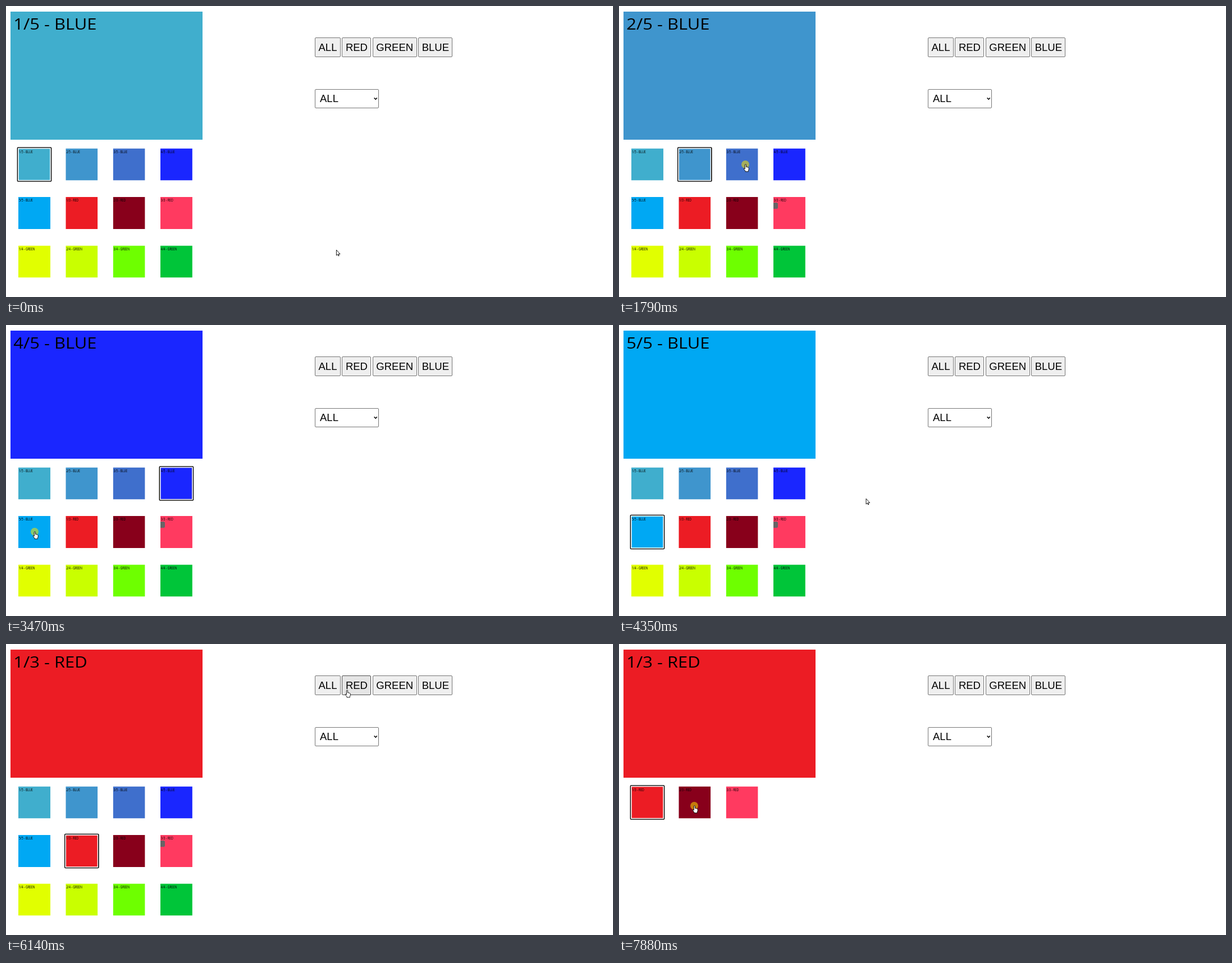
These frames come from a looping animation (1081x518 px, 8000 ms). An HTML page:

```html
<!DOCTYPE html>
<html lang="en">
<head>
<meta charset="utf-8">
<title>Colour gallery filter</title>
<style>
  html, body { margin: 0; width: 100%; height: 100%; overflow: hidden; background: #fff; }
  #stage { display: block; width: 100%; height: 100%; }
  .label { font: 27.1px "Open Sans", "Noto Sans", sans-serif; }
  .ui text { font: 18.5px "Liberation Sans", Arial, sans-serif; }
  .button rect { fill: #efefef; stroke: #767676; }
  .button.hover rect { fill: #e5e5e5; stroke: #4f4f4f; }
  .button.down rect { fill: #f5f5f5; stroke: #8d8d8d; }
  .cursor { fill: #fff; stroke: #000; stroke-width: .9; stroke-linejoin: round; }
</style>
</head>
<body>
<svg id="stage" viewBox="0 0 1081 518">
  <g id="gallery"></g>
  <g id="ring" fill="none">
    <rect x="-1.5" y="-1.5" width="60" height="60" rx="1" stroke="#000" stroke-width="1.6"/>
    <rect width="57" height="57" stroke="#fff" stroke-width="1.4"/>
  </g>
  <path id="smudge" d="M275 350h5.5q2.5 0 2.5 2.5v6q0 2.5-2.5 2.5h-5.5z" fill="#686466"/>
  <g class="ui" id="buttons"></g>
  <g class="ui">
    <rect x="550.5" y="148.5" width="113" height="33" rx="1.5" fill="#fff" stroke="#767676"/>
    <text x="559" y="171.4">ALL</text>
    <path d="M655.6 163.4l2.6 2.7 2.6-2.7" fill="none" stroke="#000" stroke-width="1.5"/>
  </g>
  <g id="pointer">
    <circle id="press" r="7" fill="rgba(250,225,0,.55)"/>
    <path id="arrow" class="cursor" d="M.4 .2V10L2.6 8 4 11 5.3 10.4 4 7.5H7Z"/>
    <path id="hand" class="cursor" d="M-.7 1Q-.7-.2.4-.2T1.5 1V4.4L3 4.6 4.4 5 5.6 5.6Q6.2 6 6.2 7V9L5.3 11.3V12.8H-.1V11.6L-2.6 8.4Q-3.1 7-2.1 6.9L-.7 8Z"/>
  </g>
</svg>
<script>
const LOOP = 8000;
const FRAME = 1000 / 15;
const SIZE = 57;
const HOLD = 60;
const $ = id => document.getElementById(id);

const GROUPS = {
  BLUE: ["#40aecd", "#3f95cd", "#3f6fcc", "#1a26ff", "#00a8f3"],
  RED: ["#ec1c24", "#88001b", "#ff3a60"],
  GREEN: ["#e1ff00", "#c9ff00", "#6eff00", "#00c539"]
};
const SLIDES = Object.entries(GROUPS).flatMap(([group, fills]) =>
  fills.map((fill, i) => ({ group, fill, label: `${i + 1}/${fills.length} - ${group}` })));
const FIRST_RED = SLIDES.findIndex(s => s.group === "RED");

// Pointer trips: each ends at a point, curving towards "via", and may end in a click
const HOME = [588, 434];
const TRIPS = [
  { leave: 70, arrive: 600, to: [130, 280], via: [350, 395], click: 920 },
  { leave: 1250, arrive: 1530, to: [225, 282], click: 1790 },
  { leave: 1930, arrive: 2330, to: [305, 288], click: 2530 },
  { leave: 2660, arrive: 3010, to: [51, 368], via: [150, 390], click: 3470 },
  { leave: 3870, arrive: 4630, to: [207, 427], via: [840, 130] },
  { leave: 4700, arrive: 4840, to: [141, 367], click: 4970, hold: 2 * HOLD },
  { leave: 5310, arrive: 6210, to: [614, 78], click: 6670 },
  { leave: 7200, arrive: 7810, to: [134, 288], via: [-180, 600], click: 7880, hold: 2 * HOLD }
];
const CLICKS = TRIPS.filter(trip => trip.click)
  .map(({ click, hold = HOLD }) => ({ down: click, up: click + hold }));

function make(parent, name, attrs, text) {
  const el = document.createElementNS("http://www.w3.org/2000/svg", name);
  for (const key in attrs) el.setAttribute(key, attrs[key]);
  if (text) el.textContent = text;
  return parent.appendChild(el);
}

function makeSlide({ label, fill }, x, y, width, height) {
  const box = make($("gallery"), "svg", { x, y, width, height, viewBox: "0 0 300 228", preserveAspectRatio: "none" });
  make(box, "rect", { width: 300, height: 228, fill });
  make(box, "text", { x: 4.7, y: 32.3, class: "label" }, label);
  return box;
}

const mains = SLIDES.map(s => makeSlide(s, 8, 10, 342, 228));
const thumbs = SLIDES.map(s => makeSlide(s, 0, 0, SIZE, SIZE));

// Buttons sit in a row, each as wide as its text plus padding
let edge = 550;
const buttons = ["ALL", "RED", "GREEN", "BLUE"].map(label => {
  const el = make($("buttons"), "g", { class: "button" });
  const rect = make(el, "rect", { y: 56.5, height: 34, rx: 1.5 });
  const text = make(el, "text", { x: edge + 6.5, y: 79.9 }, label);
  const x = Math.round(edge);
  const width = Math.round(text.getComputedTextLength() + 12.9);
  rect.setAttribute("x", x + .5);
  rect.setAttribute("width", width - 1);
  edge += width + 2.4;
  return { el, x, width };
});

const show = (el, on) => { el.style.display = on ? "" : "none"; };
const cell = i => [22 + 84.3 * (i % 4), 253.5 + 86.5 * Math.floor(i / 4)];
const inside = ([px, py], x, y, w, h) => px >= x && px < x + w && py >= y && py < y + h;

function pointerAt(t) {
  const i = TRIPS.findLastIndex(trip => t >= trip.leave);
  if (i < 0) return HOME;
  const { leave, arrive, to, via } = TRIPS[i];
  if (t >= arrive) return to;
  const from = i ? TRIPS[i - 1].to : HOME;
  const steps = Math.round((arrive - leave) / FRAME) + 1;
  const u = Math.min(1, Math.floor((t - leave) / FRAME + 1) / steps);
  const e = u * u * (3 - 2 * u);
  return to.map((end, k) => {
    const bend = via ? via[k] : (from[k] + end) / 2;
    return (1 - e) ** 2 * from[k] + 2 * e * (1 - e) * bend + e * e * end;
  });
}

function draw(t) {
  // Clicks walk through the slides up to the first red one, then the RED button filters
  const done = CLICKS.filter(c => t >= c.up).length;
  const chosen = Math.min(done, FIRST_RED);
  const filtered = done > FIRST_RED;
  const pressed = CLICKS.some(c => t >= c.down && t < c.up);
  const pos = pointerAt(t);
  let link = false;

  mains.forEach((el, i) => show(el, i === chosen));
  thumbs.forEach((el, i) => {
    const on = !filtered || SLIDES[i].group === "RED";
    const [x, y] = cell(filtered ? i - FIRST_RED : i);
    show(el, on);
    if (!on) return;
    el.setAttribute("x", x);
    el.setAttribute("y", y);
    if (i === chosen) $("ring").setAttribute("transform", `translate(${x} ${y})`);
    link = link || inside(pos, x, y, SIZE, SIZE);
  });
  buttons.forEach(({ el, x, width }) => {
    const over = inside(pos, x, 56, width, 35);
    el.classList.toggle("hover", over);
    el.classList.toggle("down", over && pressed);
    link = link || over;
  });

  show($("smudge"), t >= 400 && !filtered);
  show($("press"), pressed);
  show($("hand"), link);
  show($("arrow"), !link);
  $("pointer").setAttribute("transform", `translate(${pos[0]} ${pos[1]})`);
}

const begin = performance.now();
function tick() {
  draw((performance.now() - begin) % LOOP);
  requestAnimationFrame(tick);
}
tick();
</script>
</body>
</html>
```
